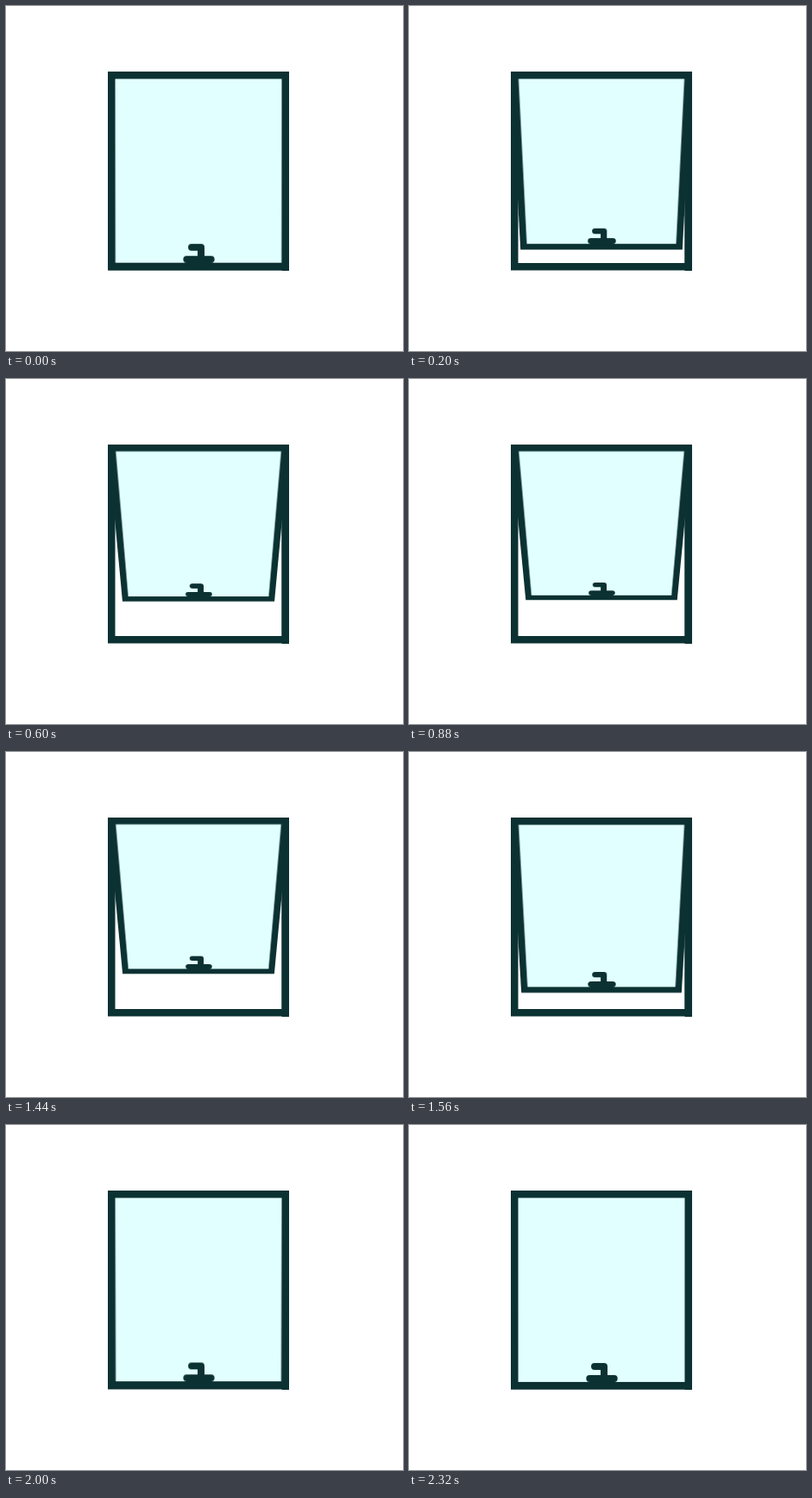
Recreate the animation shown at these times as an HTML page. Size 460x400 px, loop 2880 ms.

```html
<!DOCTYPE html>
<html lang="en">
<head>
<meta charset="utf-8">
<title>Awning window</title>
<style>
  html, body { margin: 0; width: 100%; height: 100%; overflow: hidden; background: #fff; }
  .window { position: absolute; left: 118px; top: 76px; width: 210px; height: 230.5px; perspective: 640px; }
  svg { position: absolute; left: 0; top: 0; width: 210px; height: 231px; overflow: visible; fill: none; stroke: #0c3132; stroke-width: 8.5; }
  #sash { transform-origin: 50% 0; }
  .glass { fill: #e2ffff; }
  .handle { stroke-width: 8; stroke-linecap: round; stroke-linejoin: round; }
</style>
</head>
<body>
<div class="window">
  <svg viewBox="0 0 210 231">
    <rect x="4.25" y="4.25" width="201.5" height="222"/>
    <path d="M205.75 0V231"/>
  </svg>
  <svg id="sash" viewBox="0 0 210 231">
    <rect class="glass" x="4.25" y="4.25" width="201.5" height="222"/>
    <path class="handle" d="M97 204H108V216M91.3 218H119.7"/>
  </svg>
</div>
<script>
  const LOOP = 2880, HALF = LOOP / 2, STEP = 40, LEAD = 20;
  const MAX_TILT = 33.2, TAU = 112;
  const sash = document.getElementById('sash');

  // Remaining distance of a critically damped spring.
  const rest = ms => (1 + ms / TAU) * Math.exp(-ms / TAU);

  function tilt(t) {
    const left = rest(t % HALF + LEAD);
    return MAX_TILT * (t < HALF ? 1 - left : left);
  }

  function draw(now) {
    const t = Math.floor((now % LOOP) / STEP) * STEP;
    // The sash comes to rest before the end of each half.
    const held = t < HALF ? Math.min(t, 880) : Math.min(t, HALF + 880);
    sash.style.transform = `rotateX(${-tilt(held).toFixed(3)}deg)`;
  }

  const start = performance.now();
  function tick() {
    draw(performance.now() - start);
    requestAnimationFrame(tick);
  }
  tick();
</script>
</body>
</html>
```
